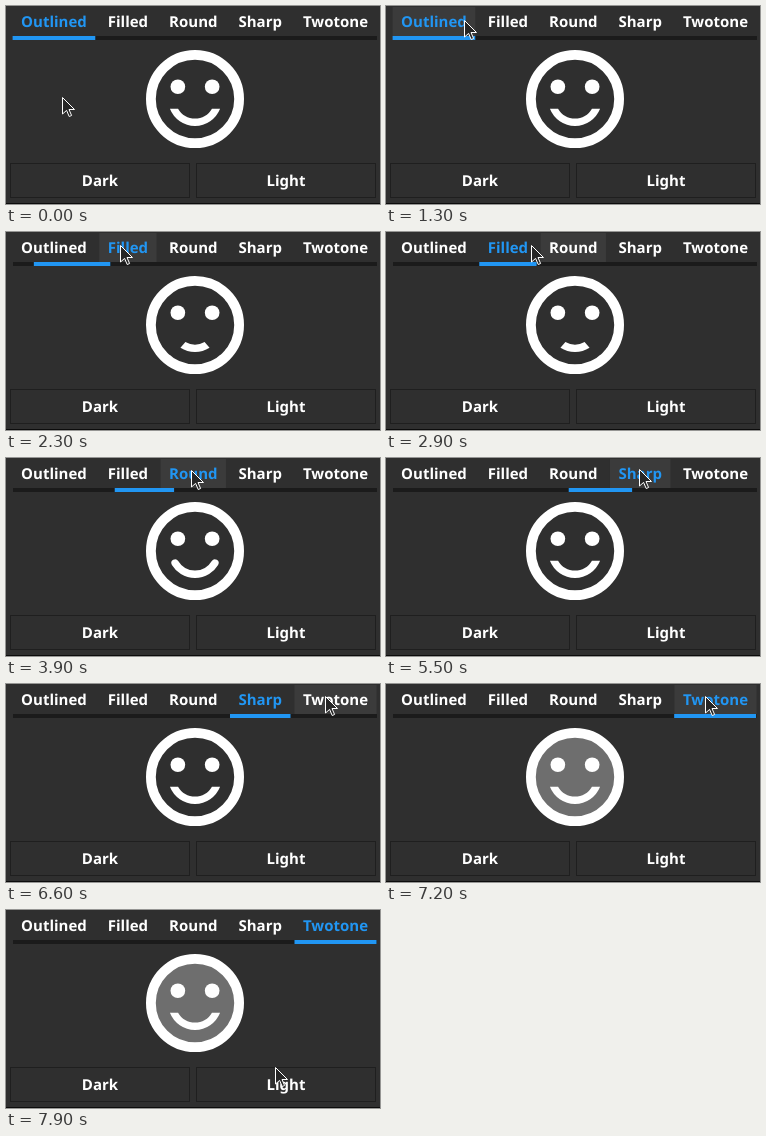
Recreate the animation shown at these times as an HTML page. Size 374 by 198 pixels, loop 8000 ms.

```html
<!DOCTYPE html>
<html lang="en">
<head>
<meta charset="utf-8">
<title>Icon style tabs</title>
<style>
  html, body { margin: 0; width: 100%; height: 100%; overflow: hidden; background: #2f2f2f; }
  svg { display: block; width: 374px; height: 198px; }
  text { font: 700 15px "Noto Sans", "Open Sans", sans-serif; fill: #fff; text-anchor: middle; text-rendering: geometricPrecision; }
</style>
</head>
<body>
<svg viewBox="0 0 374 198">
  <rect y="197" width="374" height="1" fill="#0c0c0c"/>
  <rect id="hover" y="1" height="29" fill="#3b3b3b"/>
  <rect x="7" y="30" width="364" height="4" fill="#1b1b1b"/>
  <rect id="bar" y="30" height="4" fill="#2196f3"/>
  <g id="labels"></g>

  <!-- Face drawn on a 24-unit icon grid, centred on the origin -->
  <g transform="translate(189 93) scale(4.9)" fill="#fff">
    <circle id="tone" r="8.5" fill-opacity=".3"/>
    <circle r="9" fill="none" stroke="#fff" stroke-width="2"/>
    <circle cx="-3.5" cy="-2.5" r="1.5"/>
    <circle cx="3.5" cy="-2.5" r="1.5"/>
    <path id="mouth"/>
    <path id="roundMouth" d="M-4.07 2.45A4.75 4.75 0 0 0 4.07 2.45" fill="none" stroke="#fff" stroke-width="1.5" stroke-linecap="round"/>
  </g>

  <g fill="none" stroke="#1f1f1f">
    <rect x="4.5" y="157.5" width="179" height="34"/>
    <rect x="190.5" y="157.5" width="179" height="34"/>
  </g>
  <text x="94" y="180">Dark</text>
  <text x="280" y="180">Light</text>

  <path id="cursor" d="M.5.5V17L4.6 13.4 7.2 19.5 9.6 18.5 7 12.5H12.5Z" fill="#262626" stroke="#fff"/>
</svg>
<script>
const LOOP = 8000, STEP = 100, SLIDE = 200, HOVER_LEAD = 46;
const TABS_LEFT = 6.6, TAB_PADDING = 17, TAB_GAP = 4;

const tabs = [
  { name: 'Outlined', clicked: 0 },
  { name: 'Filled', clicked: 2230 },
  { name: 'Round', clicked: 3829 },
  { name: 'Sharp', clicked: 5410 },
  { name: 'Twotone', clicked: 7010 }
];

// Each move of the pointer slows down towards its goal
const home = { x: 56, y: 91 };
const moves = [
  { start: 300, end: 400, x: 56, y: 77 },
  { start: 500, end: 1300, x: 78, y: 14 },
  { start: 1300, end: 1600, x: 114, y: 13 },
  { start: 2800, end: 3300, x: 185, y: 12 },
  { start: 4200, end: 4900, x: 253, y: 11 },
  { start: 6000, end: 6600, x: 319, y: 12 },
  { start: 7550, end: 7900, x: 269, y: 157 }
];

const el = id => document.getElementById(id);
const set = (node, attrs) => {
  for (const key in attrs) node.setAttribute(key, attrs[key]);
};
const show = (node, on) => set(node, { visibility: on ? 'visible' : 'hidden' });
const mix = (a, b, p) => a + (b - a) * p;
const clamp = p => Math.max(0, Math.min(1, p));
const easeInOut = p => p < .5 ? 2 * p * p : 1 - 2 * (1 - p) ** 2;
const easeOut = p => 1 - (1 - p) ** 2.6;

// Ring slice between radii 4 and 5.5, given its outer and inner half widths
function grin(outer, inner) {
  const yOuter = Math.sqrt(5.5 ** 2 - outer ** 2), yInner = Math.sqrt(4 ** 2 - inner ** 2);
  return `M${-outer} ${yOuter}A5.5 5.5 0 0 0 ${outer} ${yOuter}L${inner} ${yInner}A4 4 0 0 1 ${-inner} ${yInner}Z`;
}
const smile = grin(5.12, 3.46), smirk = grin(2.97, 1.96);

let left = TABS_LEFT;
for (const tab of tabs) {
  tab.label = document.createElementNS('http://www.w3.org/2000/svg', 'text');
  tab.label.textContent = tab.name;
  el('labels').append(tab.label);
  tab.x = left;
  tab.w = tab.label.getComputedTextLength() + TAB_PADDING;
  set(tab.label, { x: tab.x + tab.w / 2, y: 21 });
  left += tab.w + TAB_GAP;
}

function pointer(t) {
  return moves.reduce((at, move) => {
    const p = easeOut(clamp((t - move.start) / (move.end - move.start)));
    return { x: mix(at.x, move.x, p), y: mix(at.y, move.y, p) };
  }, home);
}

function render(t) {
  const active = tabs.filter(tab => tab.clicked <= t).length - 1;
  const to = tabs[active], from = tabs[Math.max(0, active - 1)];
  const p = easeInOut(clamp((t - to.clicked) / SLIDE));
  set(el('bar'), { x: mix(from.x, to.x, p), width: mix(from.w, to.w, p) });
  for (const tab of tabs) tab.label.style.fill = tab === to ? '#2196f3' : '#fff';

  const next = pointer(t + HOVER_LEAD);
  const over = next.y < 30 && tabs.find(tab => next.x < tab.x + tab.w + TAB_GAP);
  show(el('hover'), over);
  if (over) set(el('hover'), { x: over.x, width: over.w });

  show(el('tone'), to.name === 'Twotone');
  show(el('roundMouth'), to.name === 'Round');
  show(el('mouth'), to.name !== 'Round');
  set(el('mouth'), { d: to.name === 'Filled' ? smirk : smile });

  const { x, y } = pointer(t);
  set(el('cursor'), { transform: `translate(${Math.round(x)} ${Math.round(y)})` });
}

const start = performance.now();
function tick() {
  const t = (performance.now() - start) % LOOP;
  render(Math.floor(t / STEP) * STEP);
  requestAnimationFrame(tick);
}
tick();
</script>
</body>
</html>
```
